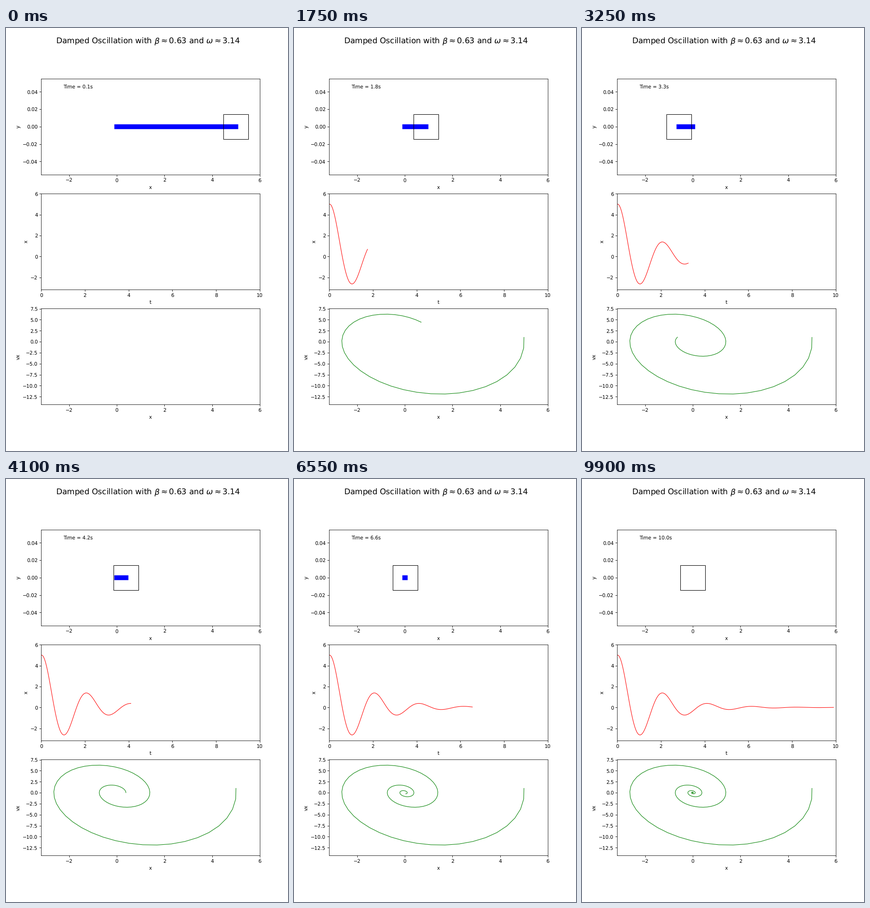
Recreate the animation shown at these times as a matplotlib script. Size 611 by 917 pixels, loop 9950 ms.

```python
import numpy as np
import matplotlib.pyplot as plt
from matplotlib.animation import FuncAnimation

DPI = 76.375
FRAMES = 199
DT = 0.05

plt.rcParams["text.hinting"] = "none"

# Damped oscillator, closed form
beta, omega = 0.2 * np.pi, np.pi
x0, v0 = 5, 1
w = np.sqrt(omega**2 - beta**2)
b = (v0 + beta * x0) / w

t = np.arange(FRAMES + 1) * DT
decay, c, s = np.exp(-beta * t), np.cos(w * t), np.sin(w * t)
x = decay * (x0 * c + b * s)
v = decay * ((b * w - beta * x0) * c - (x0 * w + beta * b) * s)


def padded(values):
    return 1.2 * values.min(), 1.2 * values.max()


# The tiny surplus keeps the height from rounding down to 916 pixels
fig, (ax_body, ax_time, ax_phase) = plt.subplots(
    3, 1, figsize=(611 / DPI, 917.001 / DPI), dpi=DPI)
fig.suptitle(rf"Damped Oscillation with $\beta\approx{beta:.2f}$"
             rf" and $\omega\approx{omega:.2f}$", x=0.5033, fontsize=16)

ax_body.set(xlim=padded(x), ylim=(-0.055, 0.055), ylabel="y")
ax_time.set(xlim=(0, 10), ylim=padded(x), ylabel="x")
ax_phase.set(xlim=padded(x), ylim=padded(v), ylabel="vx")
for ax, name in zip((ax_body, ax_time, ax_phase), "xtx"):
    ax.set_xlabel(name, labelpad=4.5)

# Just under 10.5 pixels wide, so the bar snaps to whole pixels
spring, = ax_body.plot([], [], color="blue", lw=9.85)
block, = ax_body.plot([], [], "s", ms=50, mfc="none", mec="black", mew=1)
clock = ax_body.text(0.1, 0.9, "", transform=ax_body.transAxes)
time_curve, = ax_time.plot([], [], color="red", lw=1)
phase_curve, = ax_phase.plot([], [], color="green", lw=1)


def update(i):
    pos = x[i + 1]
    spring.set_data([0, pos], [0, 0])
    block.set_data([pos], [0])
    clock.set_text(f"Time = {(i + 1) * DT:.1f}s")
    time_curve.set_data(t[:i + 1], x[:i + 1])
    phase_curve.set_data(x[:i + 1], v[:i + 1])
    return spring, block, clock, time_curve, phase_curve


anim = FuncAnimation(fig, update, frames=FRAMES, interval=50,
                     repeat=True, repeat_delay=0)
plt.show()
```
